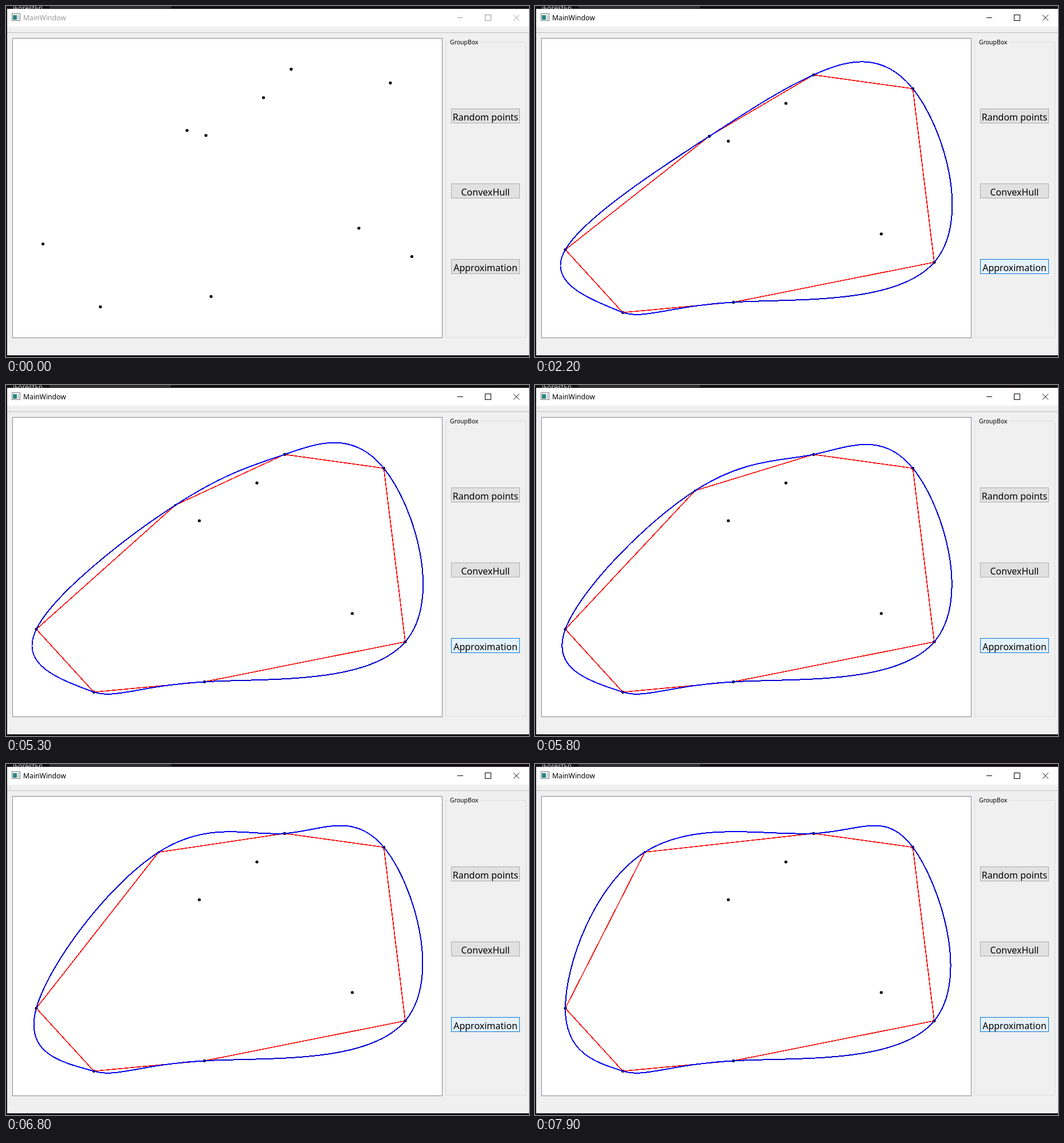
These frames come from a looping animation (913x613 px, 8 s). An HTML page:

```html
<!DOCTYPE html>
<html lang="en">
<head>
<meta charset="utf-8">
<title>Convex hull and spline</title>
<style>
  html, body { margin: 0; width: 100%; height: 100%; overflow: hidden; background: #f0f0f0; }
  svg { display: block; font-family: "Noto Sans", "Open Sans", sans-serif; }
  .crisp { shape-rendering: crispEdges; }
  .button rect { fill: #e1e1e1; stroke: #adadad; }
  .button.hot rect { fill: #e5f1fb; stroke: #0078d7; }
  .button text { font-size: 16px; text-anchor: middle; }
  #caption { color: #999; }
  #caption.active { color: #000; }
</style>
</head>
<body>
<svg width="913" height="613" viewBox="0 0 913 613">
  <g class="crisp">
    <rect width="913" height="613" fill="#141113"/>
    <rect x="76" width="212" height="4" fill="#302e30"/>
  </g>
  <text x="12" y="8" font-size="12" fill="#ccc">iForestEn</text>
  <g class="crisp">
    <rect x="2" y="5" width="911" height="605" fill="#f0f0f0"/>
    <rect x="2" y="5" width="911" height="31" fill="#fff"/>
    <path d="M2 46.5H913" stroke="#bdbdbd"/>
    <path d="M6.5 39V45" stroke="#aaa" stroke-dasharray="1 2"/>
    <rect x="11.5" y="56.5" width="750" height="523" fill="#fff" stroke="#828790"/>
    <path d="M773 63.5H767.5V578.5H907.5V63.5H827" fill="none" stroke="#dcdcdc"/>
    <rect x="10.5" y="13.5" width="14" height="12" fill="#fff" stroke="#777"/>
    <rect x="12" y="16" width="7" height="8" fill="#28857f"/>
    <rect x="20" y="16" width="3" height="8" fill="#c8d2d8"/>
  </g>
  <g id="caption">
    <text x="30" y="25" font-size="12.2" fill="currentColor">MainWindow</text>
    <g fill="none" stroke="currentColor">
      <path class="crisp" d="M788 20.5H798M836.5 15.5H846.5V25.5H836.5Z"/>
      <path d="M886 15.5L896 25.5M896 15.5L886 25.5"/>
    </g>
  </g>
  <text x="775" y="67" font-size="10.5">GroupBox</text>
  <g id="buttons"></g>
  <g id="scene">
    <g id="dots"></g>
    <g class="crisp" fill="none">
      <path id="hull" stroke="#f00" stroke-width="1.6"/>
      <path id="curve" stroke="#0000f0" stroke-width="2"/>
      <path id="grain" stroke="#000" stroke-opacity=".4" stroke-width="2" stroke-dasharray="1 2"/>
    </g>
  </g>
</svg>
<script>
const LOOP = 8000, STEP = 100;
const HULL_AT = 500, LEAVE_AT = 2000, CURVE_AT = 2100, DRAG_AT = 4600;

// The hull starts at its lowest point
const hullPoints = [[153.3, 535.3], [53, 425.5], [304.5, 227.3], [486.3, 120.3], [659.5, 144.3], [697, 447.5], [346.5, 517.3]];
const innerPoints = [[337.5, 236], [438, 170], [604.5, 398]];
const DRAGGED = 2;

// time, x, y of the dragged vertex
const dragKeys = [
  [4500, 304.5, 227.3], [4600, 306, 227], [5100, 302, 219], [5800, 279.5, 183.5],
  [6300, 282.5, 164], [6900, 263, 151], [7300, 240.5, 149.5], [7900, 191.5, 153]
];

const byId = id => document.getElementById(id);

function add(parent, tag, attributes, text = "") {
  const node = document.createElementNS("http://www.w3.org/2000/svg", tag);
  for (const name in attributes) node.setAttribute(name, attributes[name]);
  node.textContent = text;
  return parent.appendChild(node);
}

const [, hullButton, curveButton] = [["Random points", 179.5], ["ConvexHull", 310.5], ["Approximation", 442.5]]
  .map(([label, y]) => {
    const group = add(byId("buttons"), "g", { class: "button" });
    add(group, "rect", { class: "crisp", x: 777.5, y, width: 119, height: 25 });
    add(group, "text", { x: 837, y: y + 20 }, label);
    return group;
  });

const dots = [...hullPoints, ...innerPoints].map(([cx, cy]) => add(byId("dots"), "circle", { cx, cy, r: 2.6 }));

function dragPosition(time) {
  const next = dragKeys.findIndex(key => key[0] > time);
  if (next === 0) return dragKeys[0].slice(1);
  if (next < 0) return dragKeys[dragKeys.length - 1].slice(1);
  const [t0, x0, y0] = dragKeys[next - 1], [t1, x1, y1] = dragKeys[next];
  const k = (time - t0) / (t1 - t0);
  return [x0 + (x1 - x0) * k, y0 + (y1 - y0) * k];
}

// Tangents of the natural uniform cubic spline, solved by Gauss-Seidel
function splineTangents(points) {
  const last = points.length - 1;
  const tangents = points.map(() => [0, 0]);
  for (let pass = 0; pass < 20; pass++) {
    for (let i = 0; i <= last; i++) {
      const before = Math.max(i - 1, 0), after = Math.min(i + 1, last);
      for (const axis of [0, 1]) {
        let sum = 3 * (points[after][axis] - points[before][axis]);
        if (i > 0) sum -= tangents[before][axis];
        if (i < last) sum -= tangents[after][axis];
        tangents[i][axis] = sum / (i > 0 && i < last ? 4 : 2);
      }
    }
  }
  return tangents;
}

// The spline runs one point past the closing one; that extra piece is not drawn
function splineSegments(points) {
  const knots = [...points, points[0], points[1]];
  const tangents = splineTangents(knots);
  return points.map((p, i) => {
    const q = knots[i + 1];
    const c1 = p.map((v, axis) => v + tangents[i][axis] / 3);
    const c2 = q.map((v, axis) => v - tangents[i + 1][axis] / 3);
    return { path: `M${p}C${c1} ${c2} ${q}`, chord: Math.hypot(q[0] - p[0], q[1] - p[1]) };
  });
}

function draw(time) {
  const points = hullPoints.slice();
  points[DRAGGED] = dragPosition(time);
  dots[DRAGGED].setAttribute("cx", points[DRAGGED][0]);
  dots[DRAGGED].setAttribute("cy", points[DRAGGED][1]);
  dots[DRAGGED].setAttribute("r", time < DRAG_AT ? 2.6 : 2);

  const shift = time < CURVE_AT ? "11.5 -10" : time < DRAG_AT ? "0 0" : "0 1";
  byId("scene").setAttribute("transform", `translate(${shift})`);

  const segments = time < CURVE_AT ? [] : splineSegments(points);
  byId("hull").setAttribute("d", time < HULL_AT ? "" : `M${points.join("L")}Z`);
  byId("curve").setAttribute("d", segments.map(s => s.path).join(""));
  // Long segments are sampled coarsely and look darker
  byId("grain").setAttribute("d", segments.filter(s => s.chord > 300).map(s => s.path).join(""));

  byId("caption").classList.toggle("active", time >= HULL_AT);
  hullButton.classList.toggle("hot", time >= HULL_AT && time < LEAVE_AT);
  curveButton.classList.toggle("hot", time >= LEAVE_AT);
}

function tick() {
  draw(Math.floor(performance.now() % LOOP / STEP) * STEP);
  requestAnimationFrame(tick);
}
tick();
</script>
</body>
</html>
```
